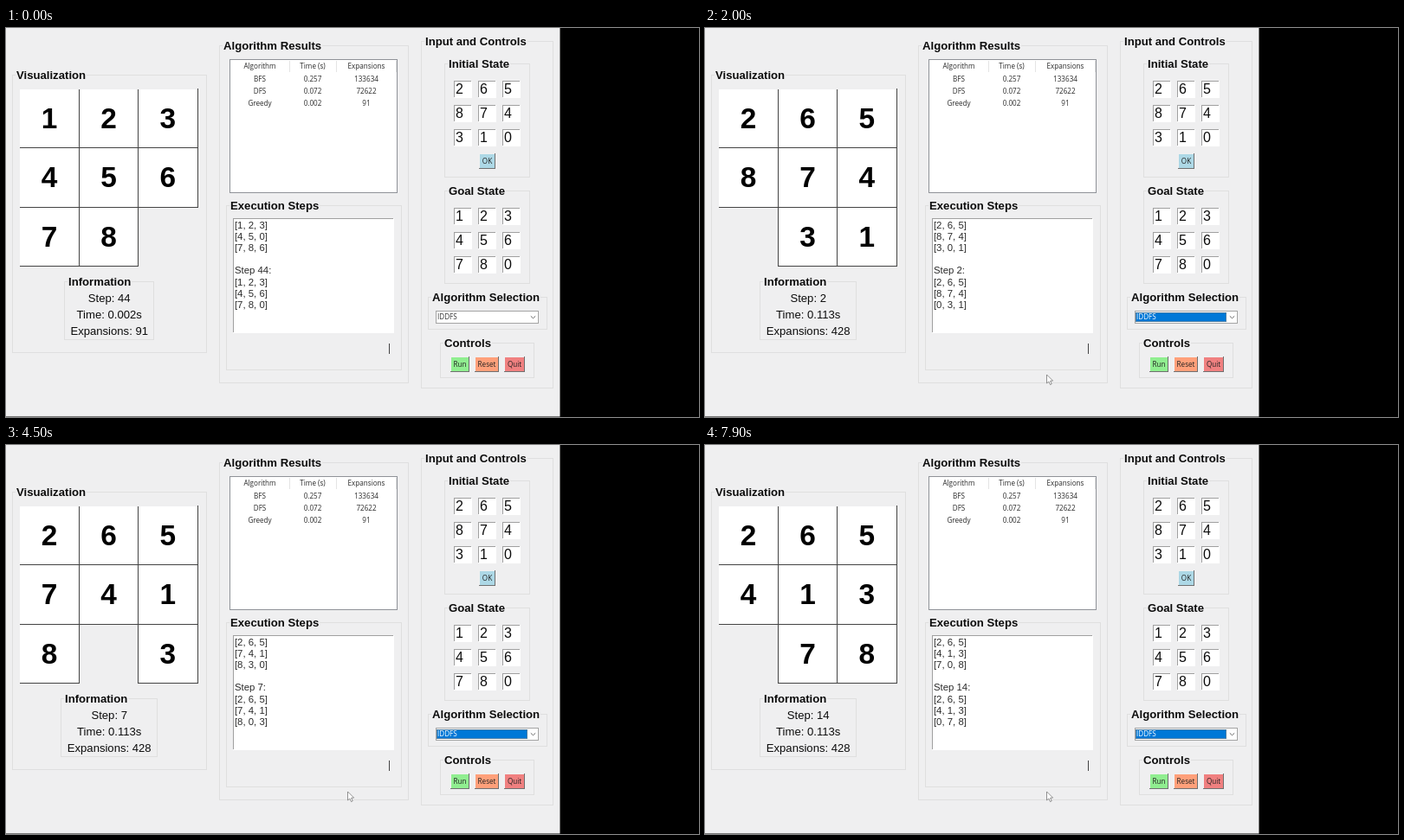
An HTML page with a canvas that plays this animation: 800x450 px, repeating every 8000 ms.

```html
<!DOCTYPE html>
<html lang="en">
<head>
<meta charset="utf-8">
<title>8-puzzle solver</title>
<style>
  html, body { margin: 0; width: 100%; height: 100%; overflow: hidden; background: #000; }
  canvas { display: block; width: 800px; height: 450px; }
</style>
</head>
<body>
<canvas id="stage" width="800" height="450"></canvas>
<script>
const ctx = document.getElementById('stage').getContext('2d');
const LOOP = 8000;
const FACE = '#efeff0';
const SANS = '"Liberation Sans", Arial, sans-serif';
const UI = '8.1px "Open Sans", "Noto Sans", sans-serif';
const LABEL = `bold 13.15px ${SANS}`;

// Each step slides one tile into the blank; this is the blank's route.
const START = [2, 6, 5, 8, 7, 4, 3, 1, 0];
const BLANK_ROUTE = [8, 7, 6, 3, 4, 5, 8, 7, 6, 3, 4, 5, 8, 7, 6];
const GOAL = [1, 2, 3, 4, 5, 6, 7, 8, 0];
const BEFORE_GOAL = [1, 2, 3, 4, 5, 0, 7, 8, 6];
const STEP_MS = 490, STEP_OFFSET = 665;
const PRESS = 950, RELEASE = 1080;

const boards = [START];
for (let i = 1; i < BLANK_ROUTE.length; i++) {
  const next = boards[i - 1].slice();
  next[BLANK_ROUTE[i - 1]] = next[BLANK_ROUTE[i]];
  next[BLANK_ROUTE[i]] = 0;
  boards.push(next);
}

function rect(x, y, w, h, color) {
  ctx.fillStyle = color;
  ctx.fillRect(x, y, w, h);
}

function outline(x, y, w, h, color) {
  ctx.strokeStyle = color;
  ctx.lineWidth = 1;
  ctx.strokeRect(x + 0.5, y + 0.5, w - 1, h - 1);
}

function text(str, x, y, font, align = 'left', color = '#0c0c0c') {
  ctx.font = font;
  ctx.textAlign = align;
  ctx.fillStyle = color;
  ctx.fillText(str, x, y);
}

function group(title, left, top, right, bottom, labelX = left + 5) {
  outline(left, top, right - left, bottom - top, '#dfdfdf');
  ctx.font = LABEL;
  rect(labelX - 1, top - 6, ctx.measureText(title).width + 2, 13, FACE);
  text(title, labelX, top + 4.7, LABEL);
}

function sunken(x, y, w, h, fill) {
  rect(x, y, w, h, '#f8f8f8');
  rect(x, y, w - 1, h - 1, '#a0a0a0');
  rect(x + 1, y + 1, w - 1, h - 1, fill);
}

function button(label, x, y, w, color, pressed = false) {
  const h = 18;
  if (pressed) {
    sunken(x, y, w, h, '#f0f0f0');
  } else {
    rect(x, y, w, h, '#707070');
    rect(x, y, w - 1, h - 1, '#f0f0f0');
    rect(x + 1, y + 1, w - 2, h - 2, color);
  }
  const shift = pressed ? 0.6 : 0;
  text(label, x + w / 2 + shift, y + 11.7 + shift, UI, 'center', '#222');
}

function entries(values, top) {
  values.forEach((value, i) => {
    const x = 517 + (i % 3) * 28, y = top + Math.floor(i / 3) * 28;
    sunken(x, y, 21, 20, '#fff');
    text(value, x + 2, y + 15.4, `16px ${SANS}`);
  });
}

function drawBoard(board) {
  const left = 15.9, top = 70.3, size = 68.4;
  const edgeX = i => Math.floor(left + i * size);
  const edgeY = i => Math.floor(top + i * size);
  const tiles = board
    .map((tile, i) => ({ tile, col: i % 3, row: Math.floor(i / 3) }))
    .filter(({ tile }) => tile);

  for (const { col, row } of tiles) {
    const x = edgeX(col), y = edgeY(row);
    rect(x, y, edgeX(col + 1) - x + 1, edgeY(row + 1) - y + 1, '#444');
  }
  for (const { tile, col, row } of tiles) {
    const x = edgeX(col) + 1, y = edgeY(row) + 1;
    rect(x, y, edgeX(col + 1) - x, edgeY(row + 1) - y, '#fff');
    text(tile, left + (col + 0.5) * size, top + row * size + 45.7,
      `bold 33.4px ${SANS}`, 'center', '#000');
  }
  // The canvas edge hides the outer top and left outlines.
  rect(edgeX(0), edgeY(0), 1, 206, FACE);
  rect(edgeX(0), edgeY(0), 206, 1, FACE);
}

function drawInfo(step, time, expansions) {
  const lines = [`Step: ${step}`, `Time: ${time}s`, `Expansions: ${expansions}`];
  const half = expansions > 99 ? 56 : 52;
  group('Information', 119 - half, 293, 119 + half, 361);
  lines.forEach((line, i) => text(line, 119.2, 316.6 + i * 19.2, `13.1px ${SANS}`, 'center'));
}

function drawTable() {
  rect(258, 36, 194, 155, '#fff');
  outline(258, 36, 194, 155, '#8f9298');
  const columns = [293, 354, 416];
  const rows = [
    ['Algorithm', 'Time (s)', 'Expansions'],
    ['BFS', '0.257', '133634'],
    ['DFS', '0.072', '72622'],
    ['Greedy', '0.002', '91']
  ];
  for (const x of [327, 381, 450]) rect(x, 38, 1, 13, '#e4e4e4');
  rows.forEach((row, r) => {
    const y = r ? 48 + r * 14 : 47.2;
    row.forEach((cell, c) => text(cell, columns[c], y, UI, 'center', '#2a2a2a'));
  });
}

function drawLog(previous, board, step) {
  const matrix = b => [0, 3, 6].map(i => `[${b.slice(i, i + 3).join(', ')}]`);
  sunken(262, 220, 186, 133, '#fff');
  const lines = [...matrix(previous), '', `Step ${step}:`, ...matrix(board)];
  lines.forEach((line, i) => text(line, 263.9, 232.4 + i * 13.02, `11.4px ${SANS}`, 'left', '#2a2a2a'));
  rect(442, 365, 1, 12, '#444');
}

function drawCombo(selected) {
  rect(496, 327, 119, 15, '#fff');
  outline(496, 327, 119, 15, '#a4a4a4');
  if (selected) {
    rect(497, 329, 105, 11, '#0078d7');
    outline(497, 329, 105, 11, '#4a7ea6');
  }
  text('IDDFS', 498, 337.4, UI, 'left', selected ? '#fff' : '#333');
  ctx.strokeStyle = '#666';
  ctx.lineWidth = 1;
  ctx.beginPath();
  ctx.moveTo(605.8, 333.3);
  ctx.lineTo(608.5, 335.8);
  ctx.lineTo(611.2, 333.3);
  ctx.stroke();
}

function ease(t, from, to) {
  const p = Math.min(1, Math.max(0, (t - from) / (to - from)));
  return p * p * (3 - 2 * p);
}

function drawCursor(t) {
  if (t < 100) return;
  const toRun = ease(t, 250, 980), away = ease(t, 1150, 1750);
  const x = 566 - 43 * toRun - 128.5 * away;
  const y = 336 + 54 * toRun + 11 * away + 9 * Math.sin(Math.PI * away);
  const shape = [[0, 0], [0, 10], [2.3, 8], [4, 11.6], [5.7, 10.8], [4.1, 7.3], [7.1, 7.1]];
  ctx.beginPath();
  shape.forEach(([dx, dy]) => ctx.lineTo(x + dx, y + dy));
  ctx.closePath();
  ctx.fillStyle = '#fff';
  ctx.fill();
  ctx.strokeStyle = '#777';
  ctx.lineWidth = 0.8;
  ctx.stroke();
}

function draw(t) {
  const step = Math.min(BLANK_ROUTE.length - 1, Math.floor((t - STEP_OFFSET) / STEP_MS));
  const running = step >= 1;
  const board = running ? boards[step] : GOAL;
  const previous = running ? boards[step - 1] : BEFORE_GOAL;
  const shownStep = running ? step : 44;

  rect(0, 0, 800, 450, '#000');
  rect(0, 0, 639.5, 449.5, FACE);

  group('Visualization', 7, 54, 232, 376);
  drawBoard(board);
  drawInfo(shownStep, running ? '0.113' : '0.002', running ? 428 : 91);

  group('Algorithm Results', 246, 20, 465, 411);
  drawTable();
  group('Execution Steps', 254, 205, 457, 396);
  drawLog(previous, board, shownStep);

  group('Input and Controls', 479, 15, 632, 417);
  group('Initial State', 506, 41, 605, 173);
  entries(START, 61);
  button('OK', 546, 145, 19, '#add8e6');
  group('Goal State', 506, 188, 605, 296);
  entries(GOAL, 208);
  group('Algorithm Selection', 487, 311, 625, 349);
  drawCombo(t >= 100);
  group('Controls', 501, 364, 610, 405);
  button('Run', 513, 380, 22, '#90ee90', t >= PRESS && t < RELEASE);
  button('Reset', 541, 380, 28, '#ffa07a');
  button('Quit', 575, 380, 24, '#f08080');
  drawCursor(t);
}

function tick() {
  draw(performance.now() % LOOP);
  requestAnimationFrame(tick);
}
tick();
</script>
</body>
</html>
```
